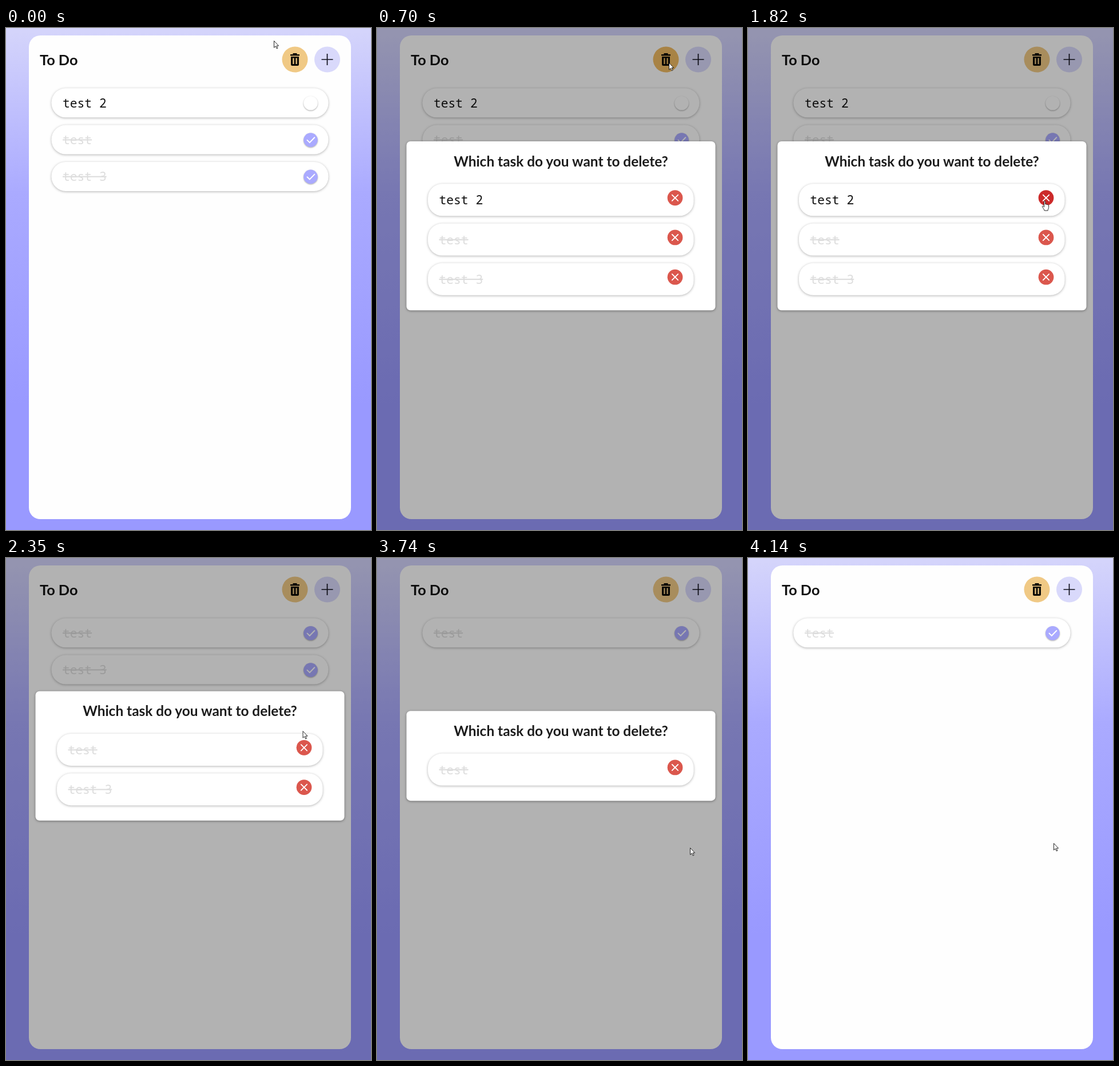
An HTML page for the animation above (4210 ms loop, 638 px wide and 877 px high).

```html
<!DOCTYPE html>
<html lang="en">
<head>
<meta charset="utf-8">
<title>To Do</title>
<style>
  html, body { margin: 0; height: 100%; overflow: hidden; }
  svg { display: block; width: 100vw; height: 100vh; }
  .title { font: 700 25.3px Lato, "Open Sans", sans-serif; fill: #111; }
  .ask { font: 700 24.4px Lato, "Open Sans", sans-serif; fill: #1c1c1c; text-anchor: middle; }
  .task { font: 300 21.3px "Noto Sans Mono", "Liberation Mono", monospace; fill: #111; white-space: pre; }
  .done { fill: #ddd; text-decoration: line-through; }
  .card { fill: #fff; filter: drop-shadow(0 1px 2px rgba(0, 0, 0, .3)); }
  .box { fill: #fff; filter: drop-shadow(0 1px 2px rgba(0, 0, 0, .4)); }
  .tick { filter: drop-shadow(0 1px 1px rgba(0, 0, 0, .35)); }
  .line { fill: none; stroke: #fff; stroke-width: 1.8; stroke-linecap: round; }
  #cursor path { fill: #fff; stroke: #111; stroke-width: .9; stroke-linejoin: round; }
</style>
</head>
<body>
<svg viewBox="0 0 638 877" preserveAspectRatio="none">
  <defs>
    <linearGradient id="sky" x2="0" y2="1">
      <stop stop-color="#d5d5fb"/>
      <stop offset=".33" stop-color="#aaf"/>
      <stop offset=".75" stop-color="#99f"/>
    </linearGradient>
  </defs>
  <rect width="638" height="877" fill="url(#sky)"/>
  <rect x="40" y="13" width="563" height="845" rx="20" fill="#fefefe"/>
  <text class="title" x="59" y="64.5">To Do</text>
  <circle id="bin" cx="505" cy="55" r="22.5"/>
  <path fill="#0c0a05" fill-rule="evenodd" d="M501.5 44h7v2h4.500v2.600h-16V46h4.500zM498 50h14v13.500q0 2.500-2.500 2.500h-9q-2.500 0-2.500-2.500zM501.300 52.500v10.500h2.200v-10.500zM506.500 52.500v10.500h2.200v-10.500z"/>
  <circle cx="561.500" cy="55" r="22.500" fill="#d9d9fb"/>
  <path d="M551.500 55h20M561.500 45v20" stroke="#10101c" stroke-width="1.700"/>
  <g id="scene"></g>
  <g id="cursor"><path/></g>
</svg>
<script>
const LOOP = 4210, OPEN = 700, CLOSE = 3810;
const ARROW = 'M.5.5V12.300l2.700-2.500 2 4.200 1.800-.8-2-4.100h3.600z';
const HAND = 'M-1 1c0-1.400 2.200-1.400 2.200 0v5c1-.8 2-.3 2 .4 1-.6 2-.1 2 .6 1-.4 1.900.1 1.900 1v3.500c0 2-1.500 3-1.500 5.500h-6c-.4-2.800-3-4.700-3.700-6.800-.3-1.200 1-1.700 1.900-.7l1.200 1.300z';

// pointer track: time, x, y
const TRACK = [
  [0, 468, 22], [430, 510, 60.5], [840, 510, 60.5], [1190, 420, 190],
  [1400, 517, 316], [1470, 528, 312], [1610, 522, 305], [1820, 518.5, 302],
  [2350, 518.5, 302], [2700, 521, 402], [3050, 521, 402], [3320, 530, 438],
  [3740, 547, 506], [3810, 547, 506], [4140, 534, 498], [LOOP, 534, 498]
];
const BASES = [0, 430, 910, 2280, 3180, 3810, 4140];

const $ = id => document.getElementById(id);

function snap(t) {
  const base = BASES.filter(b => b <= t).pop();
  return base + Math.floor((t - base) / 70) * 70;
}

function pointer(t) {
  const i = TRACK.findIndex(k => k[0] > t);
  const [t0, x0, y0] = TRACK[i - 1], [t1, x1, y1] = TRACK[i];
  const p = (t - t0) / (t1 - t0);
  return [x0 + (x1 - x0) * p, y0 + (y1 - y0) * p];
}

function tasksAt(t) {
  if (t < 2280) return ['test 2', 'test', 'test 3'];
  return t < 2980 ? ['test', 'test 3'] : ['test'];
}

const isDone = name => name !== 'test 2';
const modalTop = n => 345.7 - (87.7 + 69.2 * n) / 2;
const deleteY = (n, i) => modalTop(n) + 98.7 + 69.2 * i;

const card = (x, y, w, h, name) =>
  `<rect class="card" x="${x}" y="${y}" width="${w}" height="${h}" rx="25"/>
   <text class="task ${isDone(name) ? 'done' : ''}" x="${x + 19.5}" y="${y + h / 2 + 8}">${name}</text>`;

function listItem(name, i) {
  const y = 105.3 + 64.3 * i, cy = y + 26, done = isDone(name);
  return card(79.5, y, 484, 51, name) +
    `<circle class="tick" cx="532.5" cy="${cy}" r="12.3" fill="${done ? '#aaf' : '#fff'}"/>` +
    (done ? `<path class="line" style="stroke-width:2" d="M526.500 ${cy + .3}l4.300 4.200 8.500-8.800"/>` : '');
}

function modal(tasks, hot) {
  const n = tasks.length, top = modalTop(n);
  const rows = tasks.map((name, i) => {
    const cy = deleteY(n, i);
    return card(89, top + 74.3 + 69.2 * i, 464.5, 56, name) +
      `<circle cx="521" cy="${cy}" r="13.4" fill="${i === hot ? '#cc2a2a' : '#db574d'}"/>
       <path class="line" d="M515.800 ${cy - 5.2}l10.400 10.400m0-10.400l-10.400 10.400"/>`;
  });
  return `<rect width="638" height="877" opacity=".3"/>
    <rect class="box" x="51.500" y="${top}" width="540" height="${87.7 + 69.2 * n}" rx="7"/>
    <text class="ask" x="321.500" y="${top + 43.5}">Which task do you want to delete?</text>` + rows.join('');
}

let shown = '';
function draw(now) {
  const t = now % LOOP, [x, y] = pointer(snap(t));
  const open = t >= OPEN && t < CLOSE, tasks = tasksAt(t), n = tasks.length;
  const near = (cx, cy, r) => Math.hypot(x - cx, y - cy) < r;
  const hot = open ? tasks.findIndex((_, i) => near(521, deleteY(n, i), 13.4)) : -1;
  const overBin = !open && near(505, 55, 22.5);

  const key = [open, n, hot].join();
  if (key !== shown) {
    $('scene').innerHTML = tasks.map(listItem).join('') + (open ? modal(tasks, hot) : '');
    shown = key;
  }
  $('bin').setAttribute('fill', overBin || (open && t < 770) ? '#f0bb62' : '#f0c985');
  $('cursor').setAttribute('transform', `translate(${x} ${y})`);
  $('cursor').firstChild.setAttribute('d', hot >= 0 || overBin ? HAND : ARROW);
}

const start = performance.now();
(function tick() {
  draw(performance.now() - start);
  requestAnimationFrame(tick);
})();
</script>
</body>
</html>
```
